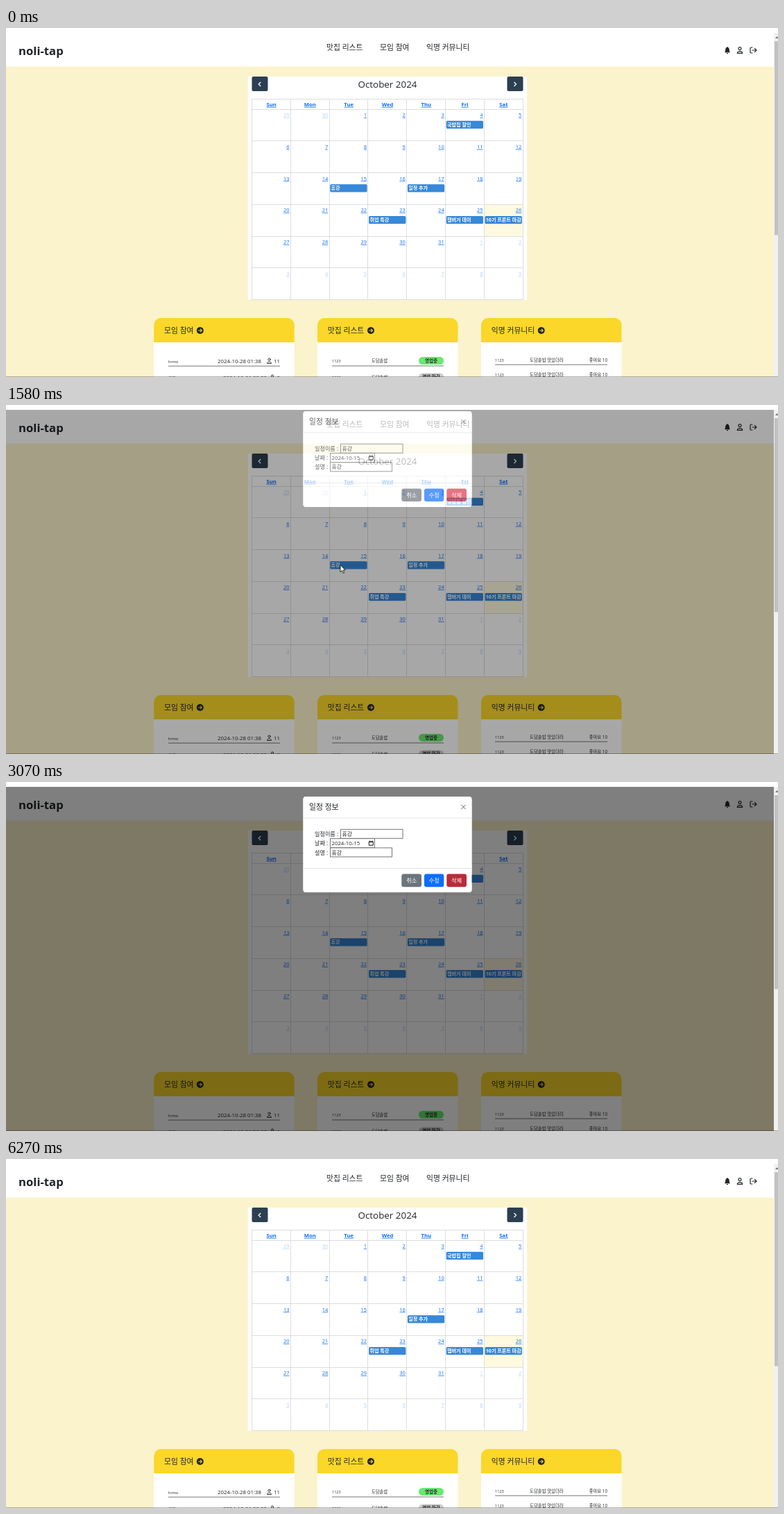
Recreate the animation shown at these times as an HTML page. Size 1113 by 503 pixels, loop 7.68 s.

```html
<!DOCTYPE html>
<html lang="ko">
<head>
<meta charset="utf-8">
<title>Calendar</title>
<style>
html, body { margin: 0; width: 100%; height: 100%; overflow: hidden; background: #fff; }
svg { display: block; width: 1113px; height: 503px; }
text { font-family: "Open Sans", "Noto Sans CJK KR", "Noto Sans CJK", sans-serif; fill: #212529; white-space: pre; }
.b { font-weight: 700; }
.m { font-weight: 500; }
.w { fill: #fff; }
.c { text-anchor: middle; }
.r { text-anchor: end; }
.link { fill: #0d6efd; text-decoration: underline; }
.faded { opacity: .3; }
.icon { fill: none; stroke: #212529; stroke-width: 1.2; stroke-linecap: round; stroke-linejoin: round; }
</style>
</head>
<body>
<svg id="stage" viewBox="0 0 1113 503"></svg>
<script>
const LOOP = 7680, COL = 55.8, ROW = 45.75, LEFT = 354.4, TOP = 117;
const DAYS = ['Sun', 'Mon', 'Tue', 'Wed', 'Thu', 'Fri', 'Sat'];
const EVENTS = [[5, 0, '국밥집 할인'], [2, 2, '휴강'], [4, 2, '일정 추가'],
  [3, 3, '취업 특강'], [5, 3, '햄버거 데이'], [6, 3, '10기 프론트 마감']];

const text = (x, y, size, s, cls = '') =>
  `<text x="${x}" y="${y}" font-size="${size}" class="${cls}">${s}</text>`;
const rect = (x, y, w, h, fill, more = '') =>
  `<rect x="${x}" y="${y}" width="${w}" height="${h}" fill="${fill}" ${more}/>`;
const path = (d, more = 'class="icon"') => `<path d="${d}" ${more}/>`;
const group = (id, body) => `<g id="${id}">${body}</g>`;
const hline = (x, y, w, fill = '#777') => rect(x, y, w, 1, fill);

const person = (x, y, s = 1) => `<g transform="translate(${x} ${y}) scale(${s})">` +
  `<circle cy="-2.4" r="2" class="icon"/>` + path('M-3.7 4.4C-3.7 .6 3.7 .6 3.7 4.4Z') + '</g>';

function header() {
  return rect(0, 0, 1113, 55.5, '#fff') +
    text(18, 38.5, 16.7, 'noli-tap', 'b') +
    text(462, 31.7, 10.8, '맛집 리스트') +
    text(539, 31.7, 10.8, '모임 참여') +
    text(606, 31.7, 10.8, '익명 커뮤니티') +
    path('M1036 35.3C1037.4 33.5 1037 32 1037.3 30.5C1037.6 28.7 1038.8 28 1039.5 27.8V27H1040.5V27.8C1041.2 28 1042.4 28.7 1042.7 30.5C1043 32 1042.6 33.5 1044 35.3ZM1038.8 36H1041.2A1.2 1.2 0 0 1 1038.8 36Z', 'fill="#212529"') +
    person(1058, 32) +
    path('M1076 28H1074.3Q1073 28 1073 29.3V34.7Q1073 36 1074.3 36H1076M1076 32H1081.7M1079.3 29.3L1082 32L1079.3 34.7');
}

function calendar() {
  let s = rect(348.7, 70, 402.5, 322, '#fff') +
    rect(354.5, 70, 23, 21, '#2c3e50', 'rx="2"') + rect(722.5, 70, 23, 21, '#2c3e50', 'rx="2"') +
    path('M367.2 78l-3 3 3 3M732.5 78l3 3-3 3', 'fill="none" stroke="#fff" stroke-width="1.3"') +
    text(550, 85.5, 13.4, 'October 2024', 'c') +
    rect(LEFT + 6 * COL, TOP + 3 * ROW, COL, ROW, 'rgba(255,220,40,.15)');
  let grid = 'M354 102.5H746';
  for (let i = 0; i < 7; i++) grid += `M354 ${Math.floor(TOP + i * ROW) + .5}H746`;
  for (let i = 0; i < 8; i++) grid += `M${Math.floor(LEFT + i * COL) + .5} 102V392`;
  s += path(grid, 'fill="none" stroke="#ddd"');
  DAYS.forEach((d, i) => s += text(LEFT + (i + .5) * COL + .3, 112.8, 7.7, d, 'b c link'));
  for (let i = 0; i < 42; i++) {
    const out = i < 2 || i > 32;
    const n = i < 2 ? 29 + i : i > 32 ? i - 32 : i - 1;
    s += text(LEFT + (i % 7 + 1) * COL - 1.7, TOP + Math.floor(i / 7) * ROW + 11, 7.5, n, 'r link' + (out ? ' faded' : ''));
  }
  EVENTS.forEach(([c, r, name], i) => {
    const x = LEFT + c * COL + 1.3, y = TOP + r * ROW + 16.8;
    s += group('event' + i, rect(x, y, 53.3, 11.2, '#3788d8', 'rx="1.5"') + text(x + 1.3, y + 7.9, 7.1, name, 'b w'));
  });
  return s;
}

function card(x, title, arrowX) {
  return rect(x, 440, 202.5, 63, '#fff') +
    path(`M${x} 453V428a10 10 0 0 1 10-10h182.5a10 10 0 0 1 10 10V453Z`, 'fill="#fad728"') +
    text(x + 14.8, 439.5, 10.8, title, 'm') +
    `<circle cx="${arrowX}" cy="436" r="5" fill="#212529"/>` +
    path(`M${arrowX - 2.6} 436h5m-2.2-2.3l2.3 2.3-2.3 2.3`, 'fill="none" stroke="#fad728" stroke-width="1.1"');
}

function cards() {
  const meeting = (y, name, date, dateX, iconX, count) =>
    text(234, y, 5.7, name) + text(dateX, y, 7.85, date) + person(iconX, y - 3, .8) + text(395, y, 7.9, count, 'r');
  const place = (y, color, state) => text(470, y, 5.5, '1123') + text(527, y, 6.3, '도담솥밥') +
    rect(595, y - 8, 36, 11, color, 'rx="5.5"') + text(613, y - .2, 6.5, state, 'b c');
  const post = y => text(705, y, 5.6, '1123') + text(755, y, 6.4, '도담솥밥 맛있더라') + text(867, y, 6.3, '좋아요 10', 'r');
  return card(213.2, '모임 참여', 279.8) + card(449, '맛집 리스트', 526) + card(685, '익명 커뮤니티', 771.7) +
    group('meetings', meeting(482.6, 'hrmo', '2024-10-28 01:38', 305, 379.5, 11) + hline(234, 486.7, 161) +
      meeting(506.5, '모임 14', '2024-10-26 23:28', 313, 384, 2)) +
    group('noMeetings', text(234, 480.8, 6.5, '참여 중인 모임이 없습니다.') + hline(234, 484.5, 161)) +
    place(482, '#69e96f', '영업중') + hline(470, 486.5, 161) + place(505.5, '#ccc', '영업 마감') +
    post(481) + hline(705, 484.7, 162) + post(502);
}

function modal() {
  const field = (y, label, x, w, value) => text(445, y + 9.7, 8.1, label) +
    rect(x, y, w, 13, '#fff', 'stroke="#767676"') + text(x + 2, y + 9.7, 7.8, value);
  const button = (id, x, w, fill, label) =>
    rect(x, 132.5, w, 18.7, fill, `rx="3" id="${id}"`) + text(x + w / 2, 144.8, 8.1, label, 'm c w');
  // The shade leaves a hole where the dialog stands.
  return path('M-9 -90H1200V700H-9ZM432.5 21H667.5a4 4 0 0 1 4 4V155a4 4 0 0 1-4 4H432.5a4 4 0 0 1-4-4V25a4 4 0 0 1 4-4Z', 'fill="#000" fill-opacity=".5" fill-rule="evenodd"') +
    rect(428.5, 21, 243, 138, '#fff', 'rx="4"') +
    text(437, 40.4, 10.8, '일정 정보') +
    path('M656.3 32.8l6.4 6.4m0-6.4l-6.4 6.4', 'stroke="#666"') +
    hline(428.5, 51.5, 243, '#dee2e6') + hline(428.5, 124, 243, '#dee2e6') +
    field(68.3, '일정이름 :', 482.5, 89.5, '휴강') +
    field(81.6, '날짜 :', 467.5, 64, '2024-10-15') +
    field(94.9, '설명 :', 467.5, 89, '휴강') +
    path('M523.3 86.2h6v5h-6zM523.3 86.2h6M524.6 84.5v1.5M528 84.5v1.5', 'fill="none" stroke="#111"') +
    button('cancel', 570.3, 28.7, '#6c757d', '취소') +
    button('edit', 603, 28.3, '#0d6efd', '수정') +
    button('remove', 635.3, 28.7, '#dc3545', '삭제');
}

const scrollbar = rect(1107, 7, 6, 496, '#f1f1f1') + rect(1108, 19, 5, 279.5, '#c1c1c1') +
  path('M1109 15l2.5-3 2.5 3Z', 'fill="#777"');

const $ = id => document.getElementById(id);
$('stage').innerHTML = '<clipPath id="page"><rect y="7" width="1107" height="496"/></clipPath>' +
  rect(0, 0, 1113, 503, '#fbf3cb') + header() + calendar() + cards() +
  `<g clip-path="url(#page)">${group('modal', modal())}</g>` + scrollbar +
  rect(0, 502, 1113, 1, 'rgba(0,0,0,.3)') +
  group('cursor', path('M0 0V10.2L2.4 8L4 11.8L5.7 11L4.1 7.4H7.2Z', 'fill="#fff" stroke="#000" stroke-width=".8"'));

// Pointer tracks: [time, x, y]
const TRACKS = [
  [[0, 1103, 506], [70, 1103, 497], [330, 760, 330], [600, 444, 215], [810, 469, 233], [880, 470, 227],
    [1030, 470, 227], [1240, 476, 232], [1380, 482, 230.5], [1700, 482, 230.5], [2130, 610, 147],
    [2200, 622, 149], [2410, 650, 142], [2940, 650, 142]],
  [[2940, 601, 98], [3070, 601, 98]],
  [[5650, 528, 9], [6270, 1092, 505]]
];

function pointer(t) {
  const track = TRACKS.find(k => t >= k[0][0] && t < k[k.length - 1][0]);
  if (!track) return null;
  const i = track.findIndex(k => k[0] > t);
  const [t0, x0, y0] = track[i - 1], [t1, x1, y1] = track[i];
  const p = (t - t0) / (t1 - t0);
  return [x0 + (x1 - x0) * p, y0 + (y1 - y0) * p];
}

const clamp = v => Math.max(0, Math.min(1, v));

// cubic-bezier(0, 0, .58, 1)
function easeOut(x) {
  let lo = 0, hi = 1;
  for (let i = 0; i < 20; i++) {
    const u = (lo + hi) / 2;
    if (1.74 * u * u * (1 - u) + u ** 3 < x) lo = u; else hi = u;
  }
  return 3 * lo * lo - 2 * lo ** 3;
}

const show = (id, on) => $(id).setAttribute('visibility', on ? 'visible' : 'hidden');

function draw(now) {
  const t = now % LOOP;
  const loading = t >= 4470 && t < 4600;
  EVENTS.forEach((e, i) => show('event' + i, !loading && (i !== 1 || t < 4470)));
  show('meetings', !loading);
  show('noMeetings', loading);

  const open = t - 1477;
  const alpha = clamp(open / 150) * clamp((3140 - t) / 70);
  show('modal', alpha > 0);
  $('modal').setAttribute('opacity', alpha);
  $('modal').setAttribute('transform', `translate(0 ${-24.3 * (1 - easeOut(clamp(open / 300)))})`);

  const at = pointer(t);
  show('cursor', at);
  if (at) $('cursor').setAttribute('transform', `translate(${at})`);
  const over = (a, b) => at && at[1] > 132 && at[1] < 152 && at[0] > a && at[0] < b;
  $('edit').setAttribute('fill', over(603, 631) ? '#0b5ed7' : '#0d6efd');
  $('remove').setAttribute('fill', t >= 2940 || over(635, 664) ? '#b82c3a' : '#dc3545');
}

let start;
function tick(now) {
  start ??= now;
  draw(now - start);
  requestAnimationFrame(tick);
}
draw(0);
requestAnimationFrame(tick);
</script>
</body>
</html>
```
